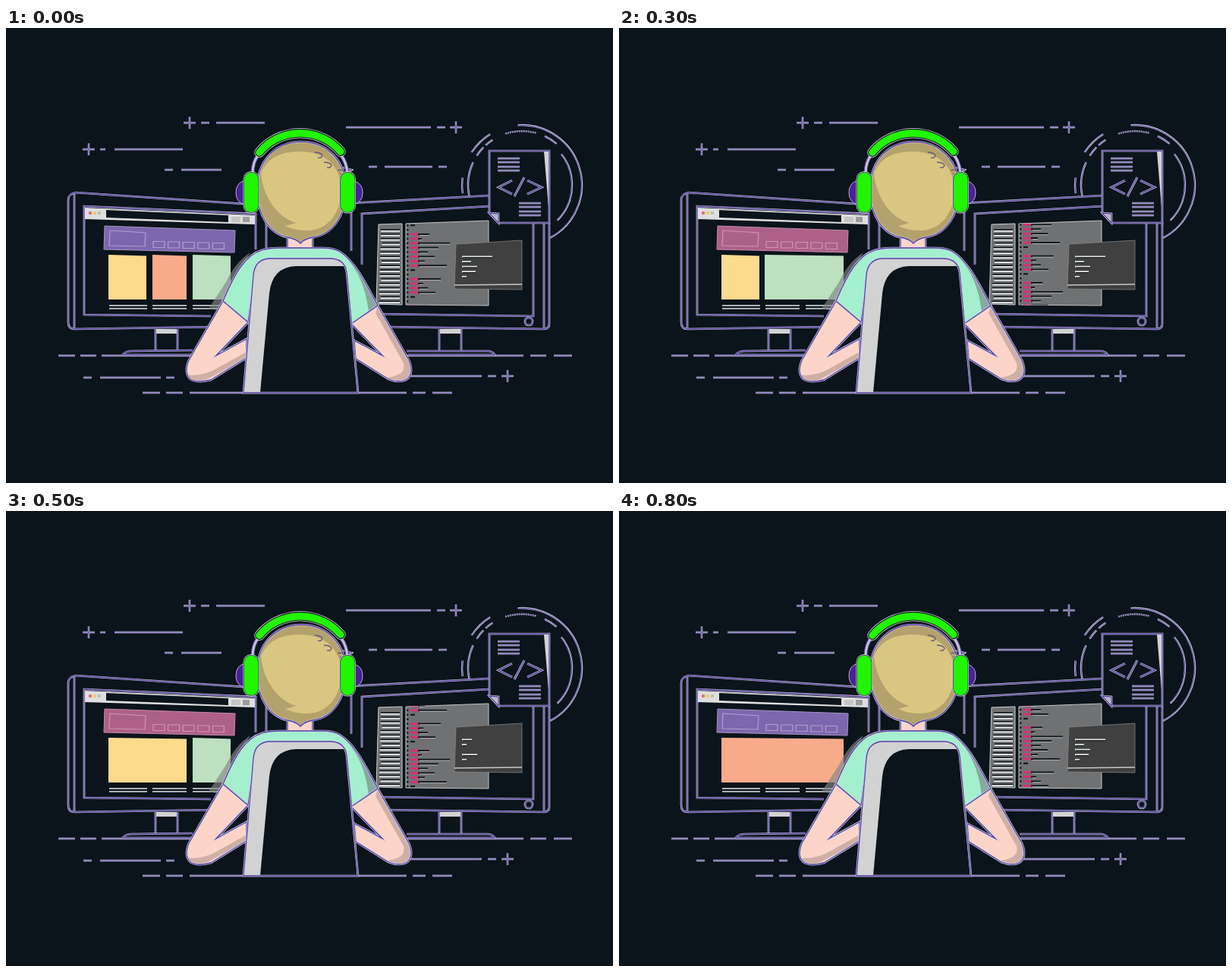
An HTML page with a canvas for the animation above (900 ms loop, 800 px wide and 600 px high).

```html
<!DOCTYPE html>
<html lang="en">
<head>
<meta charset="utf-8">
<title>Programmer at work</title>
<style>
  html, body { margin: 0; width: 100%; height: 100%; overflow: hidden; background: #0b141a; }
  canvas { display: block; width: 800px; height: 600px; }
</style>
</head>
<body>
<canvas id="stage" width="800" height="600"></canvas>
<script>
const ctx = document.getElementById('stage').getContext('2d');
const DARK = '#0b141a', PURPLE = '#5541a0', HALO = '#d6d2e6';
const GREEN = '#22f500', SKIN = '#fdd5c8', SKIN_SHADE = '#cfb0a6';
const SHIRT = '#a3efce', GRAY = '#d2d2d2', YELLOW = '#fddb8d', ORANGE = '#f8ab8b', MINT = '#bce0c0';

const fill = (d, color) => { ctx.fillStyle = color; ctx.fill(new Path2D(d)); };
const stroke = (d, color, width = 1) => {
  ctx.strokeStyle = color;
  ctx.lineWidth = width;
  ctx.stroke(new Path2D(d));
};
const outline = (d, width = 1.3) => { stroke(d, HALO, width + 1.3); stroke(d, PURPLE, width); };
const shape = (d, color) => { fill(d, color); outline(d); };
const box = (x, y, w, h, color) => { ctx.fillStyle = color; ctx.fillRect(x, y, w, h); };
const hline = (x1, x2, y) => `M${x1},${y}H${x2}`;
const plus = (x, y) => `M${x - 8},${y}h16M${x},${y - 8}v16`;
const disc = (x, y, r, color) => {
  ctx.fillStyle = color;
  ctx.beginPath();
  ctx.arc(x, y, r, 0, 7);
  ctx.fill();
};

// Arc of the badge behind the document, angles in degrees.
function badgeArc(r, from, to, dash = []) {
  const point = deg => {
    const a = deg * Math.PI / 180;
    return `${680 + r * Math.cos(a)},${207 + r * Math.sin(a)}`;
  };
  ctx.setLineDash(dash);
  outline(`M${point(from)}A${r},${r} 0 0 1 ${point(to)}`, 1);
  ctx.setLineDash([]);
}

function drawBackdrop() {
  box(0, 0, 800, 600, DARK);
  const dashes = [
    [257, 268, 125], [277, 341, 125], [124, 131, 160], [143, 233, 160], [209, 220, 187],
    [231, 284, 187], [448, 560, 131], [568, 579, 131], [478, 489, 183], [499, 562, 183],
    [570, 581, 183], [69, 91, 432], [98, 119, 432], [126, 250, 432], [524, 682, 432],
    [691, 712, 432], [722, 746, 432], [102, 113, 461], [124, 204, 461], [211, 222, 461],
    [533, 627, 459], [635, 646, 459], [180, 203, 481], [211, 233, 481], [242, 528, 481],
    [536, 553, 481], [562, 588, 481]
  ];
  outline(dashes.map(d => hline(...d)).join('') +
    plus(242, 125) + plus(109, 160) + plus(593, 131) + plus(661, 459), 1.1);

  badgeArc(79, 172, 187);
  badgeArc(79, 213, 238);
  badgeArc(79, 266, 422);
  badgeArc(71, 168, 205);
  badgeArc(71, 213, 237, [14, 4]);
  badgeArc(71, 252, 285, [2, 1]);
  badgeArc(71, 295, 310);
  badgeArc(66, 322, 405);
}

function drawMonitors() {
  outline('M343,291V234L92,217Q82,219 82,226V388Q82,397 91,397L278,394M90,219V396' +
    'M329,292V245L103,235V378L270,380');
  outline('M455,294V231L636,221M469,312V245L637,235M695,257V380L488,377' +
    'M709,257V397L498,394M716,257V390Q716,397 709,397');
  outline('M694,387a5,5 0 1 0-10,0a5,5 0 1 0 10,0');
  for (const x of [197, 571]) {
    box(x + 1, 397, 29, 6, GRAY);
    outline(`M${x},397V425M${x + 29},397V425`);
  }
  outline('M154,431Q157,426 166,426L246,425M154,431H245');
  outline('M528,426H636Q642,427 644,431H530');
}

function drawDocument() {
  shape('M637,162H716V257H649L637,244Z', DARK);
  fill('M709,163H715V236Z', GRAY);
  shape('M637,244L649,245V257Z', '#b8b8b8');
  outline([172, 177, 183, 188].map(y => hline(648, 677, y)).join('') +
    [231, 236, 242, 247].map(y => hline(676, 705, y)).join(''), 1);
  outline('M667,201L649,210L667,219M683,197L670,222M687,201L706,210L687,219', 1.5);
}

function drawBrowser(step) {
  fill('M104,237L328,247V259L104,252Z', '#dfdfdf');
  fill('M132,240L293,247V256L132,250Z', DARK);
  ['#df7181', '#eeca65', '#b9c6a3'].forEach((c, i) => disc(111 + i * 6, 244, 2.3, c));
  box(297, 249, 12, 7, '#c5c5c5');
  box(312, 249, 9, 7, '#9b9b9b');

  const rosy = step >= 3 && step <= 6;
  const banner = 'M130,261L302,267L301,296L129,292Z';
  fill(banner, rosy ? '#ae6188' : '#7d67ad');
  stroke(banner, rosy ? '#c58aaa' : '#a595c8');
  const detail = rosy ? '#d293b1' : '#b09fd0';
  stroke('M137,267L184,270L183,288L136,287Z', detail, 1.2);
  for (let i = 0; i < 5; i++) {
    const x = 194 + i * 19.6, y = 281.5 + i * 0.5;
    stroke(`M${x},${y}h15v8h-15z`, detail, 1.2);
  }

  const layouts = [
    [[135, 185, YELLOW], [193, 238, ORANGE], [246, 296, MINT]],
    [[135, 185, YELLOW], [192, 296, MINT]],
    [[135, 238, YELLOW], [246, 296, MINT]],
    [[135, 296, ORANGE]]
  ];
  const cards = layouts[Math.max(0, Math.floor((step - 1) / 2))];
  for (const [left, right, color] of cards) {
    fill(`M${left},299L${right},300.5V358H${left}Z`, color);
  }
  for (const y of [366, 370]) {
    stroke(hline(136, 186, y) + hline(193, 238, y) + hline(246, 282, y), '#e2e4e5', 1.7);
  }
}

// Right ends of the code lines; 0 is an empty row.
const CODE = [558, 548, 585, 570, 556, 565, 552, 581, 539, 0, 573, 550, 556, 566, 539, 0];
const ROW = 5.9;

function drawEditor(step) {
  const strip = 'M491,259L522,258V365L488,364Z';
  fill(strip, '#707172');
  stroke(strip, '#d0d0d0');
  for (let i = 0; i < 17; i++) {
    const y = 266 + i * ROW, left = 494 - i * 0.15 + (i % 4 === 3 ? 2 : 0);
    stroke(hline(left, 519, y), DARK, 1.7);
    stroke(hline(left, 519, y + 1.8), '#eeeeee', 1.8);
  }

  const panel = 'M527,258L636,254V366L527,365Z';
  fill(panel, '#707172');
  stroke(panel, '#c4c4c4');
  ctx.save();
  ctx.clip(new Path2D(panel));
  const scroll = 10.1 * step;
  for (let i = -2; i < 34; i++) {
    const n = (i + CODE.length) % CODE.length;
    const y = 272 + i * ROW - scroll, end = CODE[n];
    box(528, y - 1, 2.5, 2, DARK);
    if (!end) continue;
    if (end === 539) {
      box(533, y - 1, 6, 2, DARK);
      continue;
    }
    box(533, y - 1.5, 9.5, 3, '#df2c78');
    stroke(hline(543, end, y), DARK, 2);
    stroke(hline(545, end, y + 1.4), '#c8c8c8', 0.8);
  }
  ctx.restore();
}

function drawTerminal(step) {
  const panel = 'M593,285L680,280V345L591,344Z';
  fill(panel, '#404040');
  stroke(panel, '#858585', 0.8);
  stroke('M591,339L680,338', '#c8c8c8', 1.3);
  const early = step === 1 || step === 2;
  const late = step >= 5 && step <= 7;
  const ends = late ? [614, 607, 0, 621, 607] : [641, 613, 621, early ? 606 : 619, 607];
  ends.forEach((end, i) => {
    if (!end) return;
    const y = 301.5 + i * 6.6;
    stroke(hline(601, end, y), '#e8e8e8', 2);
    stroke(hline(602, end, y + 1.2), DARK, 1);
  });
}

function drawBody() {
  const shadow = 'M322,296Q302,309 290,335L267,370L277,372L290,353L316,307Z';
  fill(shadow, 'rgba(130, 135, 133, 0.65)');

  const leftArm = 'M286,360L241,438Q234,455 243,463Q252,469 270,464L317,435V410L277,432L319,388Z';
  const rightArm = 'M490,366L531,438Q538,455 529,463Q519,469 504,463L461,436L459,412L496,432L455,390Z';
  fill(leftArm, SKIN);
  fill('M238,457Q242,468 262,465L317,435V427L272,452Q252,460 238,457Z', SKIN_SHADE);
  outline(leftArm);
  fill(rightArm, SKIN);
  fill('M490,366L531,438Q538,455 529,463Q518,468 500,461Q528,459 524,442L487,376Z', SKIN_SHADE);
  outline(rightArm);

  shape('M371,274V293H404V274Z', SKIN);
  const shirt = 'M286,360C302,322 316,299 337,293Q346,290 360,290H417Q432,290 440,295' +
    'C462,309 476,341 490,366L455,390L440,320H328L319,388Z';
  fill(shirt, SHIRT);
  fill('M440,295C462,309 476,341 490,366L478,374C474,342 464,316 440,295Z', '#86aa9d');
  outline(shirt);

  const chair = 'M313,481L326,326Q328,305 347,304H427Q446,304 449,322L464,481Z';
  const opening = 'M335,481L347,350Q351,315 382,314H448L463,481Z';
  fill(chair, GRAY);
  fill(opening, DARK);
  outline(chair);
}

function drawHead() {
  const hair = 'M331,212C331,175 355,150 389,150C424,150 448,176 448,212' +
    'C448,248 430,273 404,276Q393,278 388,284Q383,278 371,276C347,271 331,247 331,212Z';
  fill(hair, '#b4a26d');
  fill('M336,192C344,170 365,162 390,163C425,164 442,187 442,213C442,244 424,267 397,267' +
    'Q380,267 368,261L383,257C359,251 339,224 336,192Z', '#d9c681');
  outline(hair);
  stroke('M407,164q8,0 10,4q-1,4-6,3M419,177q8,0 10,4q-1,4-6,3M437,188q8-3 9,3q-2,3-6,1', '#675a7c', 1.3);
  outline('M444,184L456,187L449,192', 1);

  const pads = ['M315,201Q303,204 303,217Q303,230 315,233', 'M459,202Q470,205 470,217Q470,230 459,232'];
  for (const pad of pads) {
    fill(pad, '#4a2196');
    stroke(pad, HALO, 0.8);
  }

  const arms = 'M333,167Q325,176 325,192M441,167Q449,177 450,192';
  stroke(arms, PURPLE, 5);
  stroke(arms, '#c4c2cf', 3);

  ctx.lineCap = 'round';
  const band = 'M334,164A70,70 0 0 1 441,163';
  stroke(band, '#d8d8dd', 13.4);
  stroke(band, DARK, 11.8);
  stroke(band, GREEN, 9.5);
  ctx.lineCap = 'butt';

  for (const x of [314, 441]) {
    const cup = new Path2D();
    cup.roundRect(x, 190.5, 18.5, 52.5, 9);
    ctx.strokeStyle = HALO;
    ctx.lineWidth = 3;
    ctx.stroke(cup);
    ctx.strokeStyle = '#29404b';
    ctx.lineWidth = 1.6;
    ctx.stroke(cup);
    ctx.fillStyle = GREEN;
    ctx.fill(cup);
  }
}

function render() {
  const step = Math.floor((performance.now() % 900) / 100);
  drawBackdrop();
  drawMonitors();
  drawBrowser(step);
  drawEditor(step);
  drawTerminal(step);
  drawDocument();
  drawBody();
  drawHead();
  requestAnimationFrame(render);
}
render();
</script>
</body>
</html>
```
